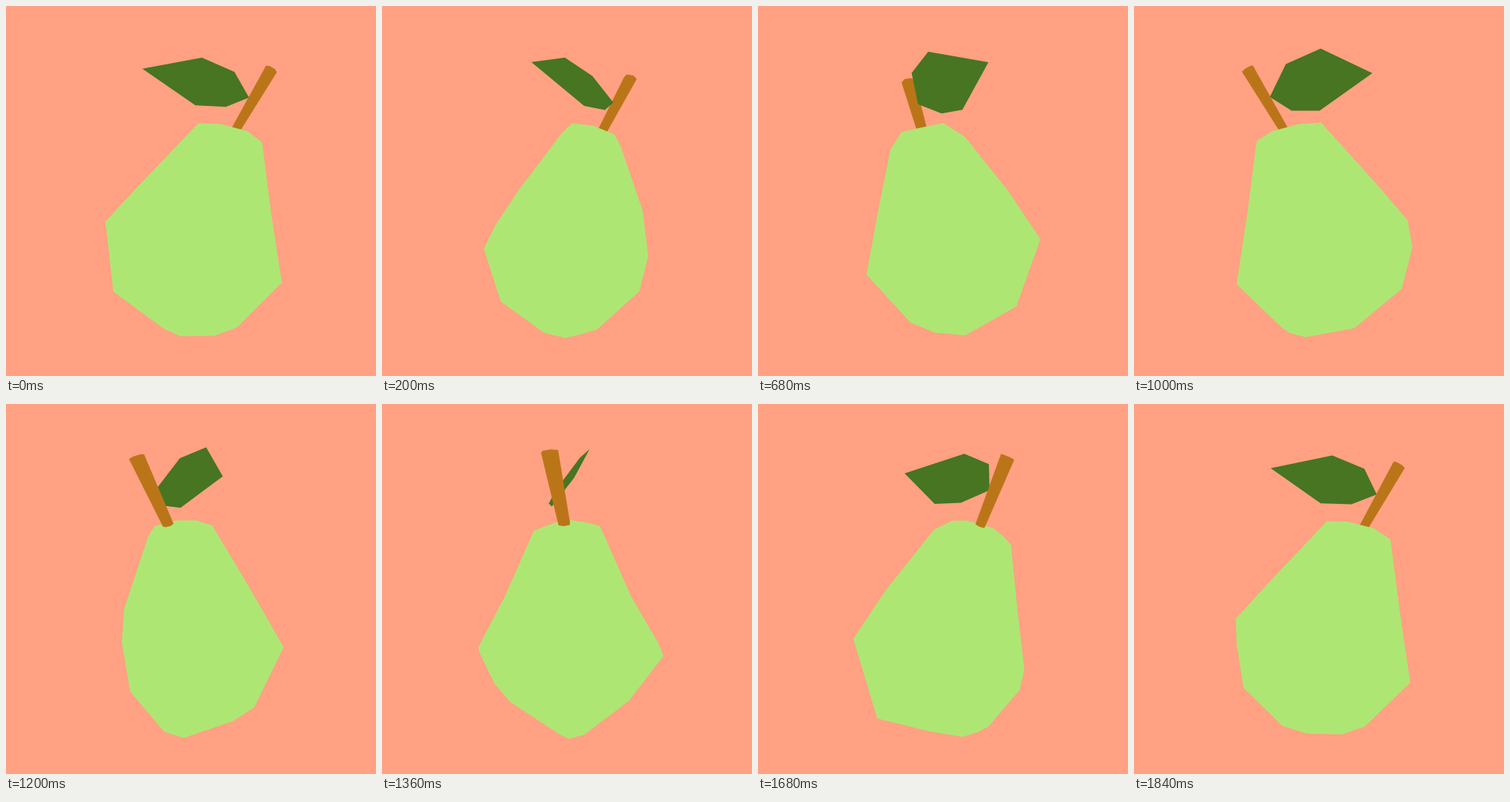
Write an HTML page with a canvas that moves like this. It is 500 px wide and 500 px high and loops after 1880 ms.

```html
<!DOCTYPE html>
<html lang="en">
<head>
<meta charset="utf-8">
<title>Spinning pear</title>
<style>
  html, body { margin: 0; width: 100%; height: 100%; overflow: hidden; background: #ffa182; }
  canvas { display: block; width: 100vw; height: 100vh; }
</style>
</head>
<body>
<canvas id="stage" width="500" height="500"></canvas>
<script>
const ctx = document.getElementById('stage').getContext('2d');
const STEP = 40, STEPS = 47;
const CX = 256, CY = 245, DIST = 785;
const SKY = '#ffa182', SKIN = '#aee674', LEAF = '#477522', WOOD = '#bb7519';

// Corners as [x, y, depth] around the vertical spin axis.
const crown = [
  [4, -87, 4], [90, -61, 0], [15, -77, 41], [50, -76, 40], [75, -54, 41],
  [30, -72, -45], [10, -71, -41], [34, -85, -5], [45, -80, 25], [69, -75, -10]
];
const neck = [
  [-76, -3, 0], [0, 14, 80], [5, 14, -91], [70, 31, 65],
  [102, 33, 0], [-52, 6, -65], [70, 31, -65], [-50, 5, 55]
];
const belly = [
  [-121, 46, -4], [-109, 78, -40], [-112, 79, 40], [116, 128, -5],
  [-12, 94, -134], [20, 83, -124], [-81, 70, -96], [-37, 168, -96],
  [30, 130, -99], [-38, 79, 115], [0, 93, 123], [70, 118, 84],
  [-111, 141, 0], [56, 188, -5], [25, 201, 1], [-20, 198, -13],
  [-42, 191, 5], [-30, 183, 40], [-30, 160, 75], [50, 188, 25]
];
const leaf = [
  [-71, -158.5, -8], [9, -181, 26], [54, -160, 20],
  [72, -120.5, -5], [40, -105.5, -23], [0, -107, -27]
];

// Six-sided end of the stem, square to its slanted axis.
function ring(x, y, z, across, deep) {
  return Array.from({ length: 6 }, (_, i) => {
    const a = i * Math.PI / 3, c = across * Math.cos(a);
    return [x + c * 0.86, y + c * 0.51, z + deep * Math.sin(a)];
  });
}
const stem = [...ring(54, -77, 0, 6, 8), ...ring(101.5, -158, -9, 8.5, 11)];

function project(points, angle) {
  const c = Math.cos(angle), s = Math.sin(angle);
  return points.map(([x, y, z]) => {
    const k = DIST / (DIST + x * s + z * c);
    return [CX + k * (x * c - z * s), CY + k * y];
  });
}

function hull(points) {
  const sorted = [...points].sort((p, q) => p[0] - q[0] || p[1] - q[1]);
  const chain = list => {
    const out = [];
    for (const p of list) {
      while (out.length > 1) {
        const [a, b] = out.slice(-2);
        if ((b[0] - a[0]) * (p[1] - a[1]) > (b[1] - a[1]) * (p[0] - a[0])) break;
        out.pop();
      }
      out.push(p);
    }
    return out.slice(0, -1);
  };
  return [...chain(sorted), ...chain(sorted.reverse())];
}

function fill(points, color) {
  ctx.fillStyle = color;
  ctx.beginPath();
  points.forEach(([x, y]) => ctx.lineTo(x, y));
  ctx.fill();
}

function draw(angle) {
  const solid = (points, color) => fill(hull(project(points, angle)), color);
  const drawStem = () => solid(stem, WOOD);
  const drawLeaf = () => fill(project(leaf, angle), LEAF);
  const drawPear = () => {
    solid([...crown, ...neck], SKIN);
    solid([...neck, ...belly], SKIN);
  };
  const depth = Math.sin(angle);
  const order = depth >= 0 ? [drawStem, drawLeaf, drawPear]
    : depth > -0.4 ? [drawLeaf, drawStem, drawPear]
    : [drawLeaf, drawPear, drawStem];
  ctx.fillStyle = SKY;
  ctx.fillRect(0, 0, 500, 500);
  order.forEach(part => part());
}

let start;
function tick(now) {
  start ??= now;
  const step = Math.floor((now - start) / STEP) % STEPS;
  draw(step / STEPS * 2 * Math.PI);
  requestAnimationFrame(tick);
}
draw(0);
requestAnimationFrame(tick);
</script>
</body>
</html>
```
